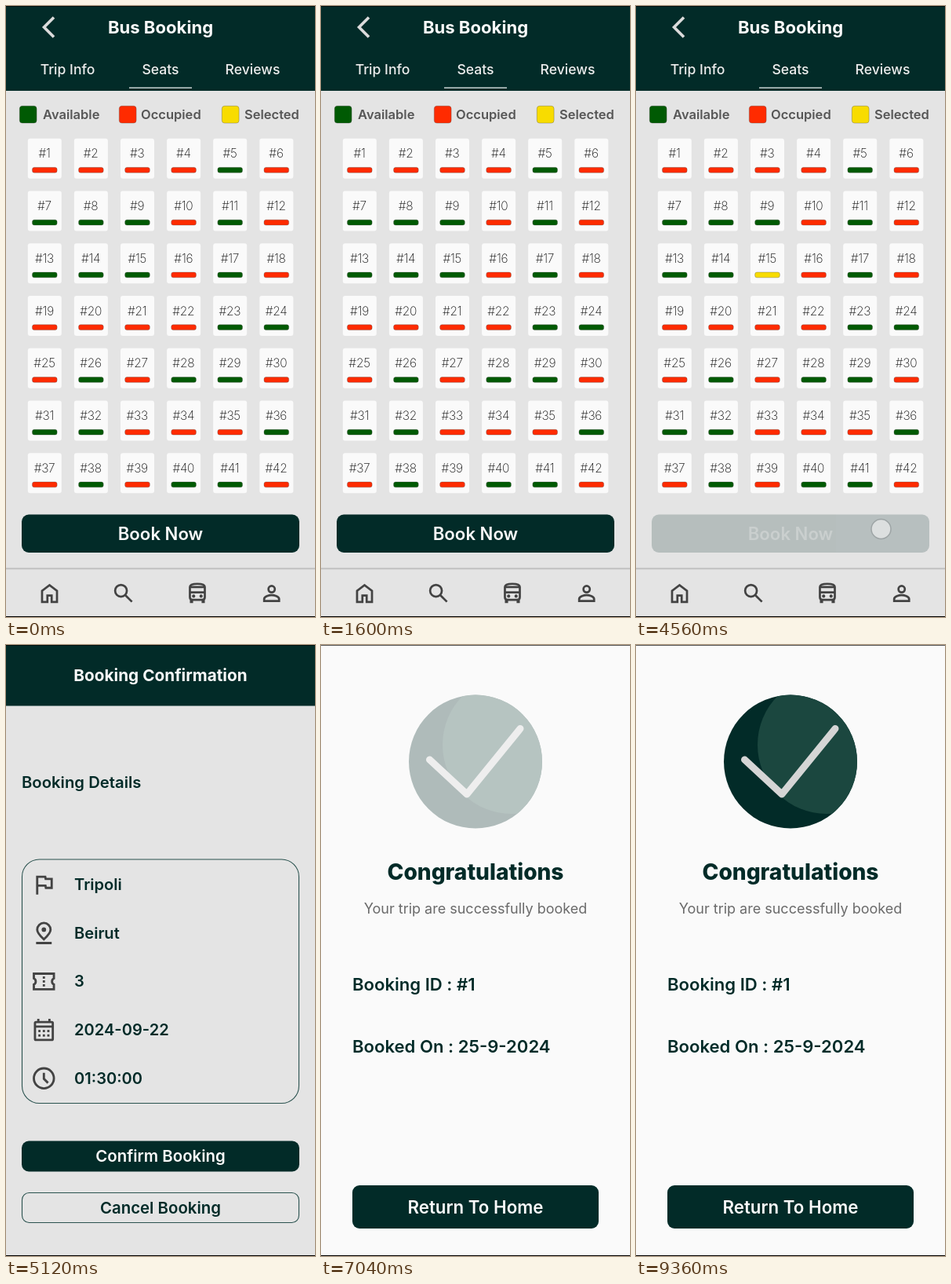
Animation, 394 px wide and 778 px high, one loop 9.44 s. Source, as an HTML page:

```html
<!DOCTYPE html>
<html lang="en">
<head>
<meta charset="utf-8">
<title>Bus Booking</title>
<style>
  html, body { margin: 0; width: 100%; height: 100%; overflow: hidden; background: #e4e4e4; }
  svg { display: block; width: 100vw; height: 100vh; font-family: Inter, "Open Sans", sans-serif; }
  .icon { fill: none; stroke: #434343; stroke-width: 2; }
  .icon .solid { fill: #434343; stroke: none; }
</style>
</head>
<body>
<svg id="stage" viewBox="0 0 394 778" preserveAspectRatio="none"></svg>
<script>
const LOOP = 9440;
const SELECT_AT = 2400, PRESS_AT = 4400, RELEASE_AT = 4640;
const CONFIRM_AT = 4720, DONE_AT = 6800;
const DARK = '#022b28', PAGE = '#e4e4e4', CARD = '#fafafa';
const GREEN = '#005a03', RED = '#ff2b00', YELLOW = '#f8dc00';
const EDGE = 'stroke="#444" stroke-opacity=".4" stroke-width=".8"';
const CHOSEN = 15;
const OCCUPIED = new Set([1, 2, 3, 4, 6, 10, 12, 16, 18, 19, 20, 21, 22,
  25, 27, 30, 33, 34, 35, 37, 39, 42]);

const rect = (x, y, w, h, r, fill, extra = '') =>
  `<rect x="${x}" y="${y}" width="${w}" height="${h}" rx="${r}" fill="${fill}" ${extra}/>`;

const text = (str, x, y, size, weight, fill, anchor = 'middle', extra = '') =>
  `<text x="${x}" y="${y}" font-size="${size}" font-weight="${weight}" fill="${fill}" text-anchor="${anchor}" ${extra}>${str}</text>`;

// Icons live on a 24-unit grid and are placed by their centre.
const icon = (shape, x, y, scale) =>
  `<g class="icon" transform="translate(${x} ${y}) scale(${scale}) translate(-12 -12)">${shape}</g>`;

const path = d => `<path d="${d}"/>`;
const dot = (x, y, r) => `<circle class="solid" cx="${x}" cy="${y}" r="${r}"/>`;
const square = (x, y, size = 2) =>
  `<rect class="solid" x="${x - size / 2}" y="${y - size / 2}" width="${size}" height="${size}"/>`;

const icons = {
  home: path('M5 20V9.5l7-5.25 7 5.25V20h-5v-6h-4v6z'),
  search: '<circle cx="9.5" cy="9.5" r="5.5"/>' + path('M13.6 13.6l6.2 6.2'),
  bus: path('M5 6c0-2.4 2.6-3 7-3s7 .6 7 3v9.5q0 2.5-2.5 2.5h-9Q5 18 5 15.5zM5 6h14M5 11h14') +
    dot(8.5, 14.5, 1.5) + dot(15.5, 14.5, 1.5) + square(6.5, 19.5, 3) + square(17.5, 19.5, 3),
  person: '<circle cx="12" cy="8" r="3"/>' +
    path('M5 19v-1.8c0-2.5 5-3.7 7-3.7s7 1.2 7 3.7V19z'),
  flag: path('M6 21V5h7.2l.4 2H19v8h-5.2l-.4-2H6'),
  pin: path('M12 17.7C8 14 6 11.5 6 9a6 6 0 0 1 12 0c0 2.5-2 5-6 8.7zM5 21h14') + dot(12, 9, 2),
  ticket: path('M3 5h18v4.3a3 3 0 0 0 0 5.4V19H3v-4.3a3 3 0 0 0 0-5.4z') +
    [8.5, 12, 15.5].map(y => square(12, y)).join(''),
  calendar: '<rect x="4" y="5" width="16" height="16" rx="1"/>' + path('M4 9h16M7 2v3M17 2v3') +
    [13, 17].map(y => [8, 12, 16].map(x => square(x, y)).join('')).join(''),
  clock: '<circle cx="12" cy="12" r="9"/>' + path('M12 7v5.4l3.7 3.7')
};

function seat(n) {
  const col = (n - 1) % 6, row = Math.floor((n - 1) / 6);
  const x = 27.8 + col * 59.1, y = 168.8 + row * 66.75;
  const id = n === CHOSEN ? 'id="chosen"' : '';
  return rect(x, y, 43, 51, 3, CARD) +
    text('#' + n, x + 21.2, y + 24.5, 15.5, 250, '#111', 'middle', 'letter-spacing="-.3"') +
    rect(x + 5.7, y + 36.7, 31.6, 6.8, 2.5, OCCUPIED.has(n) ? RED : GREEN, EDGE + id);
}

function seatsScreen() {
  const legend = [['Available', 17, GREEN, 47], ['Occupied', 144, RED, 172], ['Selected', 275, YELLOW, 304]];
  const tabs = [['Trip Info', 78.5], ['Seats', 197], ['Reviews', 314.5]];
  const nav = [['home', 55.5], ['search', 150], ['bus', 244], ['person', 338.7]];
  return rect(0, 0, 394, 778, 0, PAGE) +
    rect(0, 0, 394, 108, 0, DARK) +
    '<path d="M61 14.5L48.5 27L61 39.5" fill="none" stroke="#dcdcdc" stroke-width="3.6"/>' +
    text('Bus Booking', 197, 34.8, 22.1, 700, '#fafafa') +
    tabs.map(([s, x]) => text(s, x, 86.7, 17.6, 500, '#ededed')).join('') +
    rect(157, 103.5, 80, 1.4, 0, '#d5dddc') +
    legend.map(([s, x, fill, tx]) => rect(x + .3, 127.3, 21.8, 21.8, 3.5, fill, EDGE) +
      text(s, tx, 144, 16.5, 600, '#555', 'start')).join('') +
    Array.from({ length: 42 }, (_, i) => seat(i + 1)).join('') +
    '<g id="book">' + rect(20, 647.5, 354, 48.5, 9, DARK) +
    text('Book Now', 197, 680, 22.2, 600, '#fafafa', 'middle', 'id="bookText"') + '</g>' +
    rect(0, 715.5, 394, 1.8, 0, '#bdbdbd') +
    nav.map(([name, x]) => icon(icons[name], x, 748, 1.36)).join('') +
    '<circle id="touch" cx="312.5" cy="666" r="12.5" fill="#dcdfdf" stroke="#9da4a5" stroke-width="1.5"/>';
}

function confirmScreen() {
  const rows = [['flag', 'Tripoli'], ['pin', 'Beirut'], ['ticket', '3'],
    ['calendar', '2024-09-22'], ['clock', '01:30:00']];
  const outline = 'stroke="#2a524f" stroke-width="1.1"';
  return rect(0, 0, 394, 778, 0, PAGE) +
    rect(0, 0, 394, 77.5, 0, DARK) +
    text('Booking Confirmation', 197, 46, 20.75, 700, '#fafafa') +
    text('Booking Details', 20, 182, 20.3, 600, DARK, 'start') +
    rect(20.5, 273, 353, 310.5, 22, 'none', outline) +
    rows.map(([name, s], i) => {
      const y = 305 + i * 61.7;
      return icon(icons[name], 48.3, y, 1.42) + text(s, 87, y + 7, 20.1, 600, DARK, 'start');
    }).join('') +
    rect(20, 631.5, 354, 39, 9, DARK) +
    text('Confirm Booking', 197, 658.3, 20.4, 600, '#fafafa') +
    rect(20.5, 697.5, 353, 38, 9, 'none', outline) +
    text('Cancel Booking', 197, 723.5, 20.4, 600, DARK);
}

function doneScreen() {
  return rect(0, 0, 394, 778, 0, CARD) +
    '<clipPath id="disc"><circle cx="197" cy="148.5" r="85"/></clipPath>' +
    `<g id="badge"><circle cx="197" cy="148.5" r="85" fill="${DARK}"/>` +
    '<circle cx="243" cy="127" r="88" fill="#1b473f" clip-path="url(#disc)"/>' +
    '<path d="M138.5 146L186 190L254 106.5" fill="none" stroke="#d5d5d5" stroke-width="9" stroke-linecap="round" stroke-linejoin="round"/></g>' +
    text('Congratulations', 197, 299.3, 28.1, 800, DARK) +
    text('Your trip are successfully booked', 197, 342, 18, 400, '#6a6a6a') +
    text('Booking ID : #1', 40, 440, 22.1, 600, DARK, 'start') +
    text('Booked On : 25-9-2024', 40, 518.5, 22.1, 600, DARK, 'start') +
    rect(40, 688, 314, 55, 9, DARK) +
    text('Return To Home', 197, 723.7, 22.3, 600, '#fafafa');
}

const $ = id => document.getElementById(id);
$('stage').innerHTML =
  `<g id="seats">${seatsScreen()}</g><g id="confirm">${confirmScreen()}</g><g id="done">${doneScreen()}</g>` +
  rect(0, 0, 394, 1, 0, '#000', 'opacity=".65"') + rect(0, 777, 394, 1, 0, '#000');

const ids = ['seats', 'confirm', 'done', 'chosen', 'book', 'bookText', 'touch', 'badge'];
const el = Object.fromEntries(ids.map(id => [id, $(id)]));
const progress = (t, start, length) => Math.min(1, Math.max(0, (t - start) / length));
const smooth = p => p * p * (3 - 2 * p);
const show = (node, on) => node.setAttribute('display', on ? 'inline' : 'none');

function draw(t) {
  show(el.seats, t < CONFIRM_AT);
  show(el.confirm, t >= CONFIRM_AT && t < DONE_AT);
  show(el.done, t >= DONE_AT);

  el.chosen.setAttribute('fill', t < SELECT_AT ? GREEN : YELLOW);
  const press = smooth(progress(t, PRESS_AT, 120)) - smooth(progress(t, RELEASE_AT, 250));
  el.book.setAttribute('opacity', 1 - 0.8 * press);
  el.bookText.setAttribute('opacity', 1 - 0.6 * press);
  show(el.touch, t >= PRESS_AT && t < RELEASE_AT);

  el.badge.setAttribute('opacity', progress(t, DONE_AT + 60, 610));
}

const start = performance.now();
function tick() {
  draw((performance.now() - start) % LOOP);
  requestAnimationFrame(tick);
}
tick();
</script>
</body>
</html>
```
